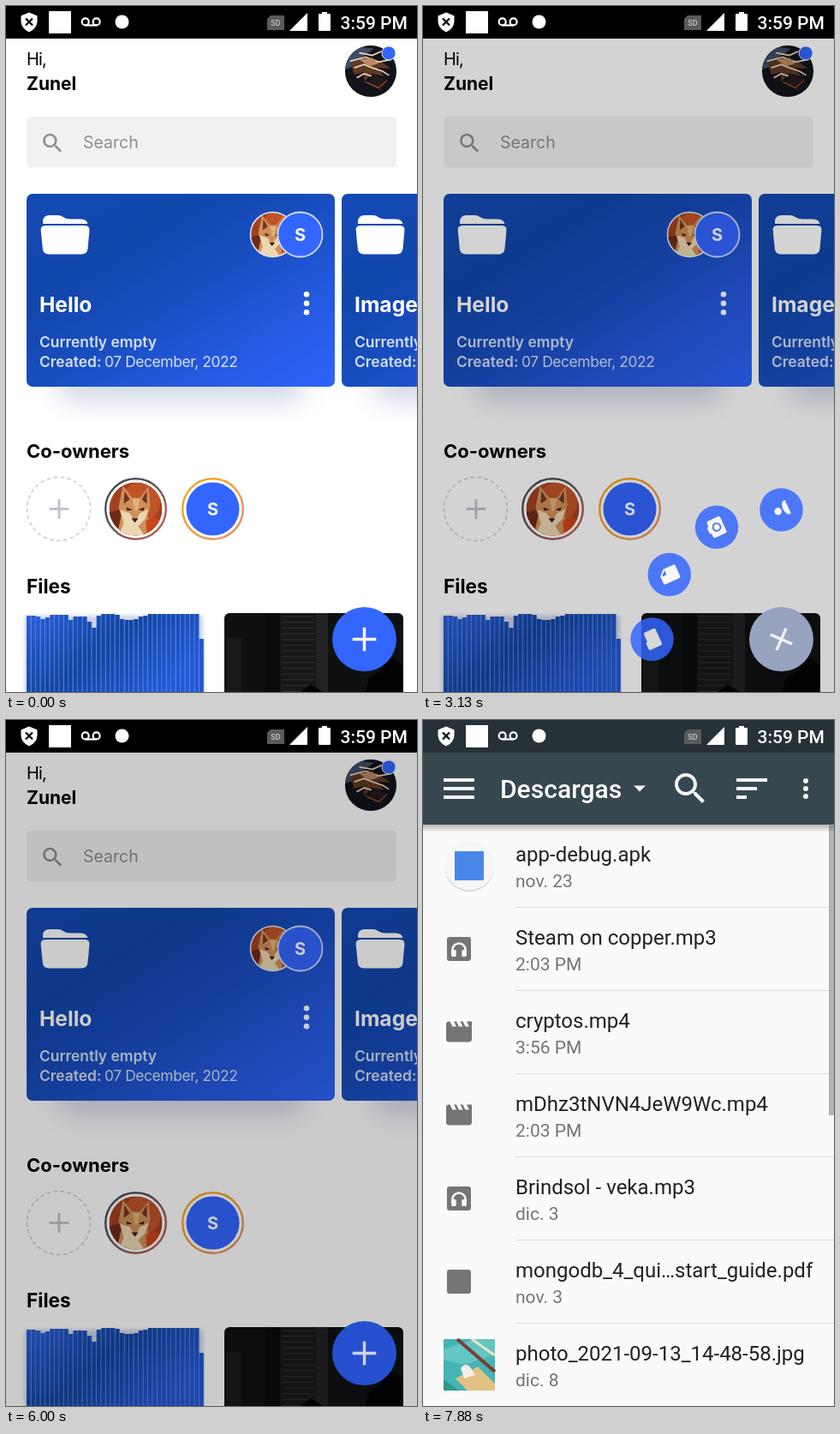
Recreate the animation shown at these times as an HTML page. Size 480 by 800 pixels, loop 8 s.

```html
<!DOCTYPE html>
<html lang="en">
<head>
<meta charset="utf-8">
<title>File manager</title>
<style>
  html, body { margin: 0; width: 100%; height: 100%; overflow: hidden; background: #fff; }
  svg { display: block; width: 480px; height: 800px; }
  text { font-family: Inter, sans-serif; }
  .b { font-weight: 700; }
  .s { font-weight: 600; }
  .r { font-family: Roboto, sans-serif; }
  .m { font-family: Roboto, sans-serif; font-weight: 500; }
</style>
</head>
<body>
<svg id="stage" viewBox="0 0 480 800"></svg>
<script>
const LOOP = 8000;
const OPEN = 2970, CLOSE = 4600, PICKER = 6863, LIST = 7380;
const FAB = { x: 418.5, y: 738.5 }, ARC = 179.5;
const BLUE = [51, 102, 255], BLUE_DIM = [38, 80, 208], GREY = [171, 174, 180];
const WHITE = [255, 255, 255], WHITE_DIM = [205, 211, 230], CROSS = [238, 239, 241];

const ICON = {
  search: 'M15.5 14h-.79l-.28-.27C15.41 12.59 16 11.11 16 9.5 16 5.91 13.09 3 9.5 3S3 5.91 3 9.5 5.91 16 9.5 16c1.61 0 3.09-.59 4.23-1.57l.27.28v.79l5 4.99L20.49 19l-4.99-5zm-6 0C7.01 14 5 11.99 5 9.5S7.01 5 9.5 5 14 7.01 14 9.5 11.99 14 9.5 14z',
  person: 'M12 12c2.21 0 4-1.79 4-4s-1.79-4-4-4-4 1.79-4 4 1.79 4 4 4zm0 2c-2.67 0-8 1.34-8 4v2h16v-2c0-2.66-5.33-4-8-4z',
  camera: 'M9 2L7.17 4H4c-1.1 0-2 .9-2 2v12c0 1.1.9 2 2 2h16c1.1 0 2-.9 2-2V6c0-1.1-.9-2-2-2h-3.17L15 2H9zm3 15c-2.76 0-5-2.24-5-5s2.24-5 5-5 5 2.24 5 5-2.24 5-5 5zm0-8.2a3.2 3.2 0 1 0 0 6.4 3.2 3.2 0 0 0 0-6.4z',
  file: 'M6 2c-1.1 0-2 .9-2 2v16c0 1.1.9 2 2 2h12c1.1 0 2-.9 2-2V8l-6-6H6zm7 7V3.5L18.5 9H13z',
  folder: 'M10 4H4c-1.1 0-2 .9-2 2v12c0 1.1.9 2 2 2h16c1.1 0 2-.9 2-2V8c0-1.1-.9-2-2-2h-8l-2-2z',
  movie: 'M18 4l2 4h-3l-2-4h-2l2 4h-3l-2-4H8l2 4H7L5 4H4c-1.1 0-2 .9-2 2v12c0 1.1.9 2 2 2h16c1.1 0 2-.9 2-2V4h-4z',
  menu: 'M3 18h18v-2H3zM3 13h18v-2H3zM3 6v2h18V6z',
  sort: 'M3 18h6v-2H3zM3 6v2h18V6zM3 13h12v-2H3z'
};

const text = (x, y, size, str, fill = '#000', cls = 's', extra = '') =>
  `<text x="${x}" y="${y}" font-size="${size}" fill="${fill}" class="${cls}" ${extra}>${str}</text>`;
const rect = (x, y, w, h, fill, rx = 0, extra = '') =>
  `<rect x="${x}" y="${y}" width="${w}" height="${h}" fill="${fill}" rx="${rx}" ${extra}/>`;
const circle = (x, y, r, fill, extra = '') =>
  `<circle cx="${x}" cy="${y}" r="${r}" fill="${fill}" ${extra}/>`;
const path = (d, fill, extra = '') => `<path d="${d}" fill="${fill}" ${extra}/>`;
const line = (d, stroke, w, extra = '') =>
  `<path d="${d}" fill="none" stroke="${stroke}" stroke-width="${w}" ${extra}/>`;
const icon = (name, x, y, k, fill) =>
  path(ICON[name], fill, `fill-rule="evenodd" transform="translate(${x} ${y}) scale(${k})"`);
const dots = (x, y, gap, r, fill) =>
  [-1, 0, 1].map(i => circle(x, y + i * gap, r, fill)).join('');

const defs = `<defs>
  <linearGradient id="blue" x1="0" y1="0" x2="1" y2="1">
    <stop offset="0" stop-color="#154ab6"/><stop offset=".28" stop-color="#1146aa"/>
    <stop offset=".5" stop-color="#184dbf"/><stop offset=".75" stop-color="#2559e0"/>
    <stop offset="1" stop-color="#2e64fc"/></linearGradient>
  <linearGradient id="bars" x1="0" y1="0" x2="1" y2=".5">
    <stop offset="0" stop-color="#2a5fdd"/><stop offset=".5" stop-color="#11459f"/>
    <stop offset="1" stop-color="#2359d8"/></linearGradient>
  <linearGradient id="ringA" x1="0" y1="0" x2="1" y2="1">
    <stop offset=".3" stop-color="#4a4f58"/><stop offset="1" stop-color="#d2625a"/></linearGradient>
  <linearGradient id="ringB" x1="0" y1="0" x2="1" y2="1">
    <stop offset=".3" stop-color="#f5a623"/><stop offset="1" stop-color="#e58a72"/></linearGradient>
  <linearGradient id="fall" x1="0" y1="0" x2="0" y2="1">
    <stop offset="0" stop-opacity=".28"/><stop offset="1" stop-opacity="0"/></linearGradient>
  <filter id="soft" x="-20%" y="-100%" width="140%" height="300%"><feGaussianBlur stdDeviation="15"/></filter>
  <filter id="edge"><feGaussianBlur stdDeviation="2"/></filter>
  <clipPath id="round"><circle r="31"/></clipPath>
  <clipPath id="photo"><rect x="255" y="708" width="209" height="120" rx="6"/></clipPath>
  <g id="fox" clip-path="url(#round)">
    ${rect(-31, -31, 62, 62, '#a3401f')}
    ${circle(6, -8, 23, '#bf5429')}
    ${path('M-31 31V4L-16 0 10 12 26 31z', '#6d2a1a')}
    ${path('M-15-27L-4-13H5L15-26 17-5 14 8 20 31H-22L-17 8-20-2z', '#cf9058')}
    ${path('M-13-21L-7-11-14-6zM13-21L7-11 13-6z', '#6e3424')}
    ${path('M-18 1L-7 5-1 15 5 5 15 0 11 12 3 20 10 31H-20L-14 17z', '#ecd6b2')}
    ${path('M-4-12H5L2 2-1 2z', '#dfb27c')}
    ${path('M-11-2l7 3-6 1zM10-2L3 1l6 1zM-5 11h8l-4 5z', '#35190f')}
    ${path('M12 14l8-5 11 5V31H13z', '#cc441c')}
  </g>
  <g id="avatar" clip-path="url(#round)">
    ${rect(-31, -31, 62, 62, '#12131b')}
    ${path('M-31-18L-12-29 4-27-10-17-20-6-31-2z', '#3d4c68')}
    ${path('M-24-9Q-8-20 10-13L24-3 8-4 16 6 1 3-8 13-8 1-20 4z', '#5e3826')}
    ${line('M-25-12L-6-17 9-11 25-14M-20-4L-8-8 2-4 14 0 22 5M-14-22L2-19 13-24M-17 8L-8 3 1 6', '#efd5b0', 1.7)}
    ${path('M-14-14L2-16 9-9-2-6z', '#b98a62')}
    ${path('M4 5L20 10 12 24-3 15z', '#241a1d')}
    ${line('M-6 13L9 20 20 11', '#a85228', 1.2)}
  </g>
  <g id="bigFolder">
    ${path('M43 254V252Q43 244 51 244H60Q64 244 67 246.3T75 248.6H86Q94 248.6 95.5 254z', '#fff')}
    ${path('M46 256H92Q98 256 97.4 262L95.5 283Q94.8 289.5 88 289.5H50Q43.5 289.5 42.8 283L40.7 262Q40 256 46 256z', '#fff')}
  </g>
</defs>`;

const pale = 'rgba(255,255,255,.82)';
const card = (dx, name) => `<g transform="translate(${dx} 0)">
  ${rect(60, 425, 290, 34, '#4a5f92', 17, 'opacity=".27" filter="url(#soft)"')}
  ${rect(24, 219, 360, 225, 'url(#blue)', 7)}
  <use href="#bigFolder"/>
  ${text(39, 357, 24.6, name, '#fff', 'b')}
  ${text(39, 398, 17.4, 'Currently empty', pale)}
  ${text(39, 421, 17.4, 'Created:', pale)}
  ${text(115, 421, 17.4, '07 December, 2022', pale, '', 'letter-spacing="-.4"')}
  ${dots(351, 346.7, 10.5, 3.3, '#fff')}</g>`;

const BARS = 38, PITCH = 5.45;
const tops = [3, 3, 4, 7, 5, 2, 2, 2, 2, 8, 4, 4, 4, 10, 17, 3, 1, 1, 1, 2, 7, 8, 8, 7, 4, 3];
const barTop = i => 708 + (i === BARS - 1 ? 30 : tops[i] ?? 1);
const barShape = Array.from({ length: BARS }, (_, i) =>
  `M${24 + i * PITCH} 800V${barTop(i)}h4.6V800z`).join('');

const filesRow = `
  ${rect(22, 711, 208, 100, '#b9c4df', 0, 'filter="url(#edge)" opacity=".75"')}
  ${path(barShape, '#4a76da', 'transform="translate(.85 0)"')}
  ${path(barShape, 'url(#bars)')}
  <g clip-path="url(#photo)">
    ${rect(255, 708, 209, 92, '#0f1012')}
    ${rect(257, 737, 18, 63, '#17191b')}
    ${rect(302, 708, 18, 92, '#0a0b0c')}
    ${rect(320, 708, 42, 92, '#17181a')}
    ${line(Array.from({ length: 14 }, (_, i) => `M322 ${712 + i * 6.7}h38`).join(''), '#2b2d30', 1.2)}
    ${rect(362, 708, 14, 92, '#202224')}
    ${path('M344 800l12-9 14 9zM420 800L424 783 438 775Q440 760 451 761 464 763 464 778V800z', '#030304')}
  </g>`;

const home = `
  ${rect(0, 0, 480, 800, '#fff')}
  ${text(24, 69, 20, 'Hi,', '#000', '', 'letter-spacing="-.8"')}
  ${text(24, 98, 21, 'Zunel', '#000', 'b')}
  <use href="#avatar" transform="translate(426 76) scale(.97)"/>
  ${circle(447, 55, 8, '#3366ff', 'stroke="#dfe6fb" stroke-width="1"')}
  ${rect(24, 129, 432, 59.5, '#f1f1f1', 5)}
  ${icon('search', 39.5, 145, 1.25, '#8d8d90')}
  ${text(90, 166, 19.5, 'Search', '#8f8f8f', '')}
  ${card(0, 'Hello')}${card(368, 'Images')}
  <use href="#fox" transform="translate(311.5 266.5) scale(.84)"/>
  ${circle(311.5, 266.5, 26, 'none', 'stroke="#e3e6ee" stroke-width="1.6"')}
  ${circle(343.5, 266.5, 26, '#3366ff', 'stroke="#cfdaf8" stroke-width="1.8"')}
  ${text(343.5, 274, 20, 'S', '#fff', 'b', 'text-anchor="middle"')}
  ${text(24, 527, 22, 'Co-owners', '#000', 'b')}
  ${circle(61.5, 586.5, 37, 'none', 'stroke="#cdcdcf" stroke-width="1.5" stroke-dasharray="4.5 3.5"')}
  ${line('M50.5 586.5h23M62 575v23', '#c3c5cd', 3)}
  ${circle(151.5, 586.5, 35.3, 'none', 'stroke="url(#ringA)" stroke-width="2.4"')}
  <use href="#fox" transform="translate(151.5 586.5)"/>
  ${circle(241.5, 586.5, 35.3, 'none', 'stroke="url(#ringB)" stroke-width="2.4"')}
  ${circle(241.5, 586.5, 31, '#3366ff')}
  ${text(241.5, 594, 20, 'S', '#fff', 'b', 'text-anchor="middle"')}
  ${text(24, 685, 22.6, 'Files', '#000', 'b')}
  ${filesRow}
  <rect id="dim" y="38" width="480" height="762" opacity="0"/>
  ${rect(0, 0, 480, 38, '#000')}
  <g transform="translate(${FAB.x} ${FAB.y})"><circle id="disc" r="37.5"/>
    <path id="plus" d="M-13.8 0H13.8M0-13.8V13.8" fill="none" stroke-width="3.4"/></g>`;

const items = ['person', 'camera', 'file', 'folder'];
const menu = items.map(name => `<g class="item">${circle(0, 0, 30, '#3366ff')}
  ${icon(name, -15.2, -15.2, 1.27, '#fff')}</g>`).join('');

const headset = y => rect(28, y - 14, 28, 28, '#757575', 3) +
  line(`M34.5 ${y + 6}v-5a7.5 7.5 0 0 1 15 0v5`, '#fafafa', 2.6) +
  rect(33.2, y + 1, 5.5, 8, '#fafafa', 1.5) + rect(45.3, y + 1, 5.5, 8, '#fafafa', 1.5);
const clapper = y => icon('movie', 24, y - 18.5, 1.5, '#757575');
const pdf = y => rect(28, y - 14, 28, 28, '#757575', 3);
const apk = y => `<g class="thumb">${circle(54, y + 1.5, 28.5, '#d2d2d2')}${circle(54, y, 28.5, '#f6f6f6')}
  ${rect(37, y - 17, 34, 34, '#4a86e8')}</g>`;
const picture = y => `<g class="thumb" transform="translate(24 ${y - 30})">
  ${rect(0, 0, 60, 60, '#45b5b4')}
  ${path('M0 12L36 0H60V18L24 30 0 24z', '#63c6c2')}
  ${line('M16 0L60 38', '#7a3d34', 4)}${line('M33 0L60 19', '#e6e2c8', 3)}
  ${path('M14 46L40 32 60 52V60H28z', '#e2c184')}
  ${path('M20 34q6-8 12 0l5 8-13 4z', '#f3efe8')}
  ${path('M0 47L18 60H0z', '#2e9697')}</g>`;

const rows = [
  ['app-debug.apk', 'nov. 23', apk],
  ['Steam on copper.mp3', '2:03 PM', headset],
  ['cryptos.mp4', '3:56 PM', clapper],
  ['mDhz3tNVN4JeW9Wc.mp4', '2:03 PM', clapper],
  ['Brindsol - veka.mp3', 'dic. 3', headset],
  ['mongodb_4_qui…start_guide.pdf', 'nov. 3', pdf],
  ['photo_2021-09-13_14-48-58.jpg', 'dic. 8', picture]
];
const list = rows.map(([name, date, draw], i) => {
  const y = 170 + i * 97;
  return draw(y) + text(108, y - 5, 24, name, '#212121', 'r') +
    text(108, y + 25, 21, date, '#757575', 'r') +
    (i < 6 ? rect(108, y + 48, 372, 1, '#d9d9d9') : '');
}).join('') + rect(474, 123, 6, 338, '#b1b2b6');

const picker = `<g id="picker">
  ${rect(0, 0, 480, 800, '#fafafa')}
  <g id="list">${list}</g>
  ${rect(0, 122, 480, 9, 'url(#fall)')}
  ${rect(0, 0, 480, 38, '#263238')}
  ${rect(0, 38, 480, 84, '#37474f')}
  ${icon('menu', 18, 56, 2, '#f4f5f6')}
  ${text(90, 91, 30, 'Descargas', '#fff', 'm')}
  ${path('M246 76.5h14l-7 7z', '#f4f5f6')}
  ${icon('search', 288, 56, 2, '#f4f5f6')}
  ${icon('sort', 360, 56, 2, '#f4f5f6')}
  ${dots(447, 80, 9, 3, '#f4f5f6')}</g>`;

const statusBar = `
  ${path('M27 7.5L36.5 11.5V18Q36 26.5 27 30.5 18 26.5 17.5 18V11.5z', '#fff')}
  ${line('M23 14.5l8 8M31 14.5l-8 8', '#111', 2.4)}
  ${rect(50, 6, 26, 26, '#fff')}
  ${line('M92.5 22.5H106', '#fff', 2.2)}
  ${[92.7, 105.6].map(x => circle(x, 18.4, 4, 'none', 'stroke="#fff" stroke-width="2.2"')).join('')}
  ${circle(135.5, 18.5, 8, '#fff')}
  ${path('M309 11h16v17h-20V15z', '#5a5a5a')}
  ${text(315, 23, 9, 'SD', '#c4c4c4', 'm', 'text-anchor="middle"')}
  ${path('M331 29L352 8V29z', '#fff')}
  ${path('M365 10q0-1 1-1h3V7h6v2h3q1 0 1 1v18q0 1-1 1h-12q-1 0-1-1z', '#fff')}
  ${text(390.5, 27, 21, '3:59 PM', '#fff', 'm')}`;

const touch = `<g id="touch">${circle(0, 0, 17, '#e4e8f4', 'opacity=".45" filter="url(#edge)"')}
  ${circle(0, 0, 14.5, '#e4e8f4', 'opacity=".28"')}</g>`;

const stage = document.getElementById('stage');
stage.innerHTML = defs + home + menu + touch + picker + statusBar;
const $ = id => document.getElementById(id);
const all = cls => [...stage.querySelectorAll('.' + cls)];
const dim = $('dim'), disc = $('disc'), plus = $('plus'), finger = $('touch');
const sheet = $('picker'), listBox = $('list'), buttons = all('item'), thumbs = all('thumb');

const clamp = v => Math.max(0, Math.min(1, v));
const mix = (a, b, p) => `rgb(${a.map((v, i) => Math.round(v + (b[i] - v) * clamp(p)))})`;

// Underdamped spring from 0 to 1, ms in
function spring(ms) {
  if (ms <= 0) return 0;
  const s = ms / 1000, w = 10.45, d = 11;
  return 1 - Math.exp(-d * s) * (Math.cos(w * s) + d / w * Math.sin(w * s));
}

const touches = [[2200, 2990, 420, 736], [4180, 4620, 263, 649]];

function render(t) {
  const closing = t >= CLOSE;
  const p = closing ? 1 - spring(t - CLOSE) : spring(t - OPEN);
  dim.setAttribute('opacity', .205 * (closing ? 1 : clamp(p)));
  disc.setAttribute('fill', mix(closing ? BLUE_DIM : BLUE, GREY, p));
  plus.setAttribute('stroke', mix(closing ? WHITE_DIM : WHITE, CROSS, p));
  plus.setAttribute('transform', `rotate(${135 * p})`);

  buttons.forEach((el, i) => {
    const a = i * Math.PI / 6;
    const x = FAB.x - Math.sin(a) * ARC * p, y = FAB.y - Math.cos(a) * ARC * p;
    el.setAttribute('transform', `translate(${x} ${y}) rotate(${720 * p}) scale(${Math.max(p, 0)})`);
    el.setAttribute('opacity', p > .01 ? clamp(p) : 0);
  });

  const tap = touches.find(([from, to]) => t >= from && t < to);
  finger.setAttribute('opacity', tap ? clamp((t - tap[0]) / 150) : 0);
  if (tap) finger.setAttribute('transform', `translate(${tap[2]} ${tap[3]})`);

  const q = t - PICKER;
  sheet.setAttribute('opacity', 1 - (1 - clamp(q / 200)) ** 4);
  sheet.setAttribute('transform', `translate(0 ${64 * (1 - clamp(q / 350)) ** 5})`);
  listBox.setAttribute('opacity', t >= LIST ? 1 : 0);
  thumbs.forEach(el => el.setAttribute('opacity', clamp((t - LIST - 100) / 250)));
}

const start = performance.now();
function tick() {
  render((performance.now() - start) % LOOP);
  requestAnimationFrame(tick);
}
tick();
</script>
</body>
</html>
```
